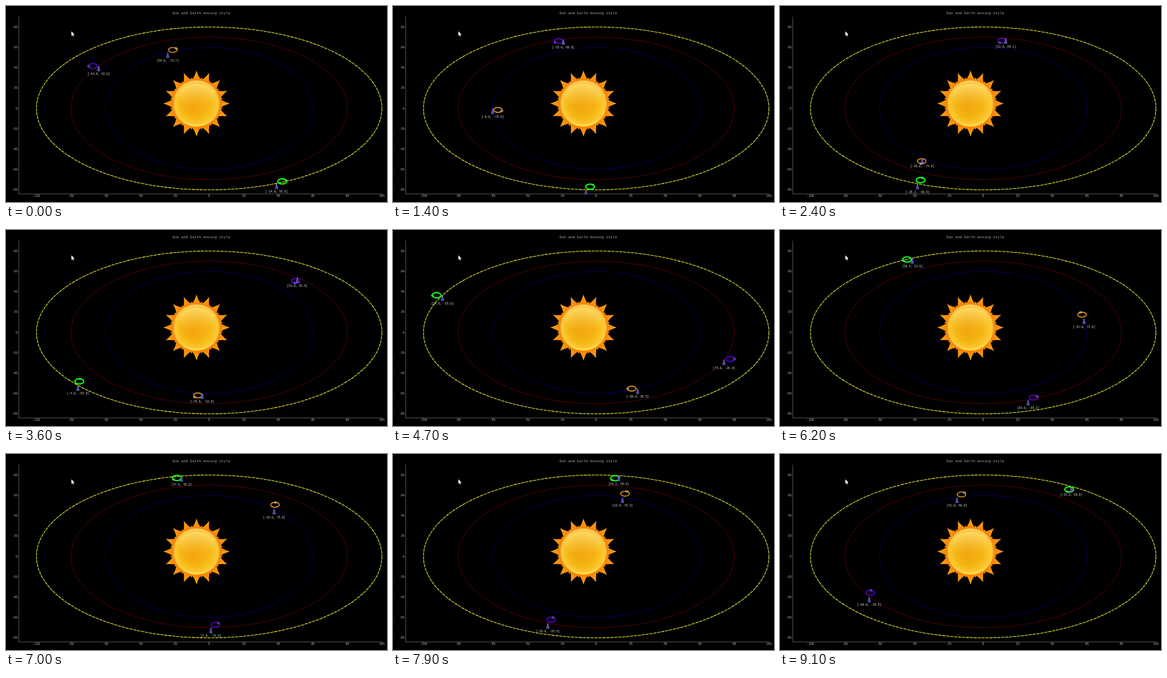
An HTML page with a canvas for the animation above (9200 ms loop, 600 by 310 pixels).

```html
<!DOCTYPE html>
<html lang="en">
<head>
<meta charset="utf-8">
<title>Orbits</title>
<style>
html, body { margin: 0; width: 100%; height: 100%; overflow: hidden; background: #000; }
canvas { display: block; width: 600px; height: 310px; }
</style>
</head>
<body>
<canvas id="stage" width="600" height="310"></canvas>
<script>
const ctx = document.getElementById('stage').getContext('2d');
const FRAME = 100, FRAMES = 92, TAU = Math.PI * 2, DEG = Math.PI / 180;
const KX = 2.72, KY = 1.61;
const px = x => 320 + x * KX;
const py = y => 162 - y * KY;
const mono = size => `${size}px "Liberation Mono", "DejaVu Sans Mono", monospace`;

// start: distance already travelled from the vertex where the first half begins
const inner = { a: 60, b: 60, start: 84, step: 0.8, left: true, ccw: true,
  color: '#ffa51e', moon: '#d8cdb4', rx: 6.8, ry: 3.9, width: 1.4,
  orbit: '#00009a', dash: [2, 1], line: 0.9 };
const middle = { a: 80, b: 70, start: 16, step: 1, left: false, ccw: false,
  color: '#5a00d8', moon: '#8f78e0', rx: 6.8, ry: 3.9, width: 1.5,
  orbit: '#8c0000', dash: [2, 1], line: 0.9 };
const outer = { a: 100, b: 80, start: 61, step: 1, left: true, ccw: false,
  color: '#0cf516', moon: '#58dc60', rx: 7, ry: 4.1, width: 2.1,
  orbit: '#f0f032', dash: [5, 1.2], line: 1.05 };
const bodies = [inner, middle, outer];

function ellipse(x, y, rx, ry, color, width) {
  ctx.beginPath();
  ctx.ellipse(x, y, rx, ry, 0, 0, TAU);
  ctx.strokeStyle = color;
  ctx.lineWidth = width;
  ctx.stroke();
}

function text(str, x, y, size, color, align = 'center') {
  ctx.font = mono(size);
  ctx.textAlign = align;
  ctx.textBaseline = 'middle';
  ctx.fillStyle = color;
  ctx.fillText(str, x, y);
}

function polygon(points, fill, stroke, width) {
  ctx.beginPath();
  points.forEach(([x, y]) => ctx.lineTo(x, y));
  ctx.closePath();
  ctx.fillStyle = fill;
  ctx.fill();
  if (!stroke) return;
  ctx.strokeStyle = stroke;
  ctx.lineWidth = width;
  ctx.stroke();
}

function drawAxes() {
  ctx.strokeStyle = '#6a6a6a';
  ctx.lineWidth = 0.8;
  ctx.beginPath();
  ctx.moveTo(20, 17);
  ctx.lineTo(20, 297.2);
  ctx.lineTo(592.5, 297.2);
  for (let v = -100; v <= 100; v += 20) {
    ctx.moveTo(px(v), 297);
    ctx.lineTo(px(v), 298.6);
    if (Math.abs(v) > 80) continue;
    ctx.moveTo(20, py(v));
    ctx.lineTo(18.6, py(v));
  }
  ctx.stroke();
  for (let v = -100; v <= 100; v += 20) {
    text(v, px(v), 300.6, 4.7, '#b4b4b4');
    if (Math.abs(v) <= 80) text(v, 18, py(v) + 0.3, 4.7, '#b4b4b4', 'right');
  }
  text('Sun and Earth moving style', 307.5, 11.5, 5.85, '#aaaaaa');
}

function drawOrbit(body) {
  ctx.setLineDash(body.dash);
  ellipse(320, 162, body.a * KX, body.b * KY, body.orbit, body.line);
  ctx.setLineDash([]);
}

function drawSun() {
  const spikes = 16, seg = TAU / spikes;
  ctx.save();
  ctx.translate(300, 154.3);
  const at = (r, a) => [r * Math.sin(a), -r * Math.cos(a)];

  ctx.beginPath();
  for (let i = 0; i < spikes; i++) {
    const a = i * seg;
    ctx.lineTo(...at(52.3, a));
    ctx.quadraticCurveTo(...at(43, a + seg * 0.17), ...at(39.5, a + seg * 0.4));
    ctx.lineTo(...at(42, a + seg * 0.5));
    ctx.lineTo(...at(39.5, a + seg * 0.6));
    ctx.quadraticCurveTo(...at(43, a + seg * 0.83), ...at(52.3, a + seg));
  }
  const flame = ctx.createRadialGradient(0, 0, 34, 0, 0, 52);
  flame.addColorStop(0, '#ee7a00');
  flame.addColorStop(0.45, '#fb9008');
  flame.addColorStop(1, '#ffa51c');
  ctx.fillStyle = flame;
  ctx.fill();

  const disc = (r, fill) => {
    ctx.beginPath();
    ctx.arc(0, 0, r, 0, TAU);
    ctx.fillStyle = fill;
    ctx.fill();
  };
  const rim = ctx.createLinearGradient(0, -37, 0, 37);
  rim.addColorStop(0, '#fbc765');
  rim.addColorStop(0.5, '#f8b02c');
  rim.addColorStop(1, '#ffd84a');
  disc(36.8, rim);
  const glow = ctx.createRadialGradient(-6, 4, 4, 0, 0, 35);
  glow.addColorStop(0, '#f3a80e');
  glow.addColorStop(0.55, '#f5b414');
  glow.addColorStop(1, '#fccd30');
  disc(34, glow);
  ellipse(0, 0, 33.7, 33.7, 'rgba(255,225,120,0.5)', 1);

  const shine = ctx.createLinearGradient(0, -32, 0, 4);
  shine.addColorStop(0, 'rgba(255,240,200,0.42)');
  shine.addColorStop(1, 'rgba(255,230,160,0)');
  ctx.beginPath();
  ctx.ellipse(0, -13, 28, 18, 0, 0, TAU);
  ctx.fillStyle = shine;
  ctx.fill();
  ctx.restore();
}

function drawCursor() {
  const shape = [[0, 0], [0, 7.2], [1.6, 5.8], [2.7, 8.2], [3.8, 7.7], [2.8, 5.3], [4.9, 5.2]];
  polygon(shape.map(([x, y]) => [103 + x, 40 + y]), '#fff');
}

function locate(body, n) {
  const span = body.a * 2;
  const travel = body.start + n * body.step;
  const half = Math.floor(travel / span);
  const along = travel - half * span;
  const left = body.left === (half % 2 === 0);
  const x = left ? body.a - along : along - body.a;
  const h = body.b * Math.sqrt(Math.max(0, 1 - (x / body.a) ** 2));
  const y = left === body.ccw ? h : -h;
  let turn = (left ? 0 : 180) + 90 * along / span;
  if (body.ccw) {
    const beta = Math.atan2(y, x) / DEG;
    turn = 136 + 17 * Math.cos((beta - 145) * DEG) - beta;
  }
  return { x, y, turn: turn * DEG };
}

function drawBody(body, pos, shown) {
  const x = px(pos.x), y = py(pos.y);
  const c = Math.cos(pos.turn), s = -Math.sin(pos.turn);
  const rx = x + 0.3 + 9.6 * c, ry = y - 0.5 + 5.8 * s;
  ellipse(rx, ry, body.rx, body.ry, body.color, body.width);
  ellipse(rx + 6.6 * c, ry + 3.9 * s, 1.9, 1.4, body.moon, 0.8);
  polygon([[x, y + 0.3], [x + 2, y + 8.2], [x - 2, y + 8.2]], '#3232c8', '#a5a5d8', 0.6);
  text(`[${shown.x.toFixed(1)}, ${shown.y.toFixed(1)}]`, x, y + 13.6, 4.5, '#dcdcdc');
}

function draw(k) {
  ctx.fillStyle = '#000';
  ctx.fillRect(0, 0, 600, 310);
  drawAxes();
  bodies.forEach(drawOrbit);
  drawSun();

  const n = Math.round(3.19 * k);
  const a = locate(inner, Math.round(3.18 * k + 0.05));
  const b = locate(middle, n);
  const c = locate(outer, n);
  ctx.save();
  ctx.beginPath();
  ctx.rect(20, 17, 573, 281);
  ctx.clip();
  // the inner and outer bodies carry each other's coordinates
  drawBody(inner, a, c);
  drawBody(middle, b, b);
  drawBody(outer, c, a);
  ctx.restore();
  drawCursor();
}

const begin = performance.now();
function tick() {
  const t = performance.now() - begin;
  draw(Math.floor(t / FRAME) % FRAMES);
  requestAnimationFrame(tick);
}
tick();
</script>
</body>
</html>
```
